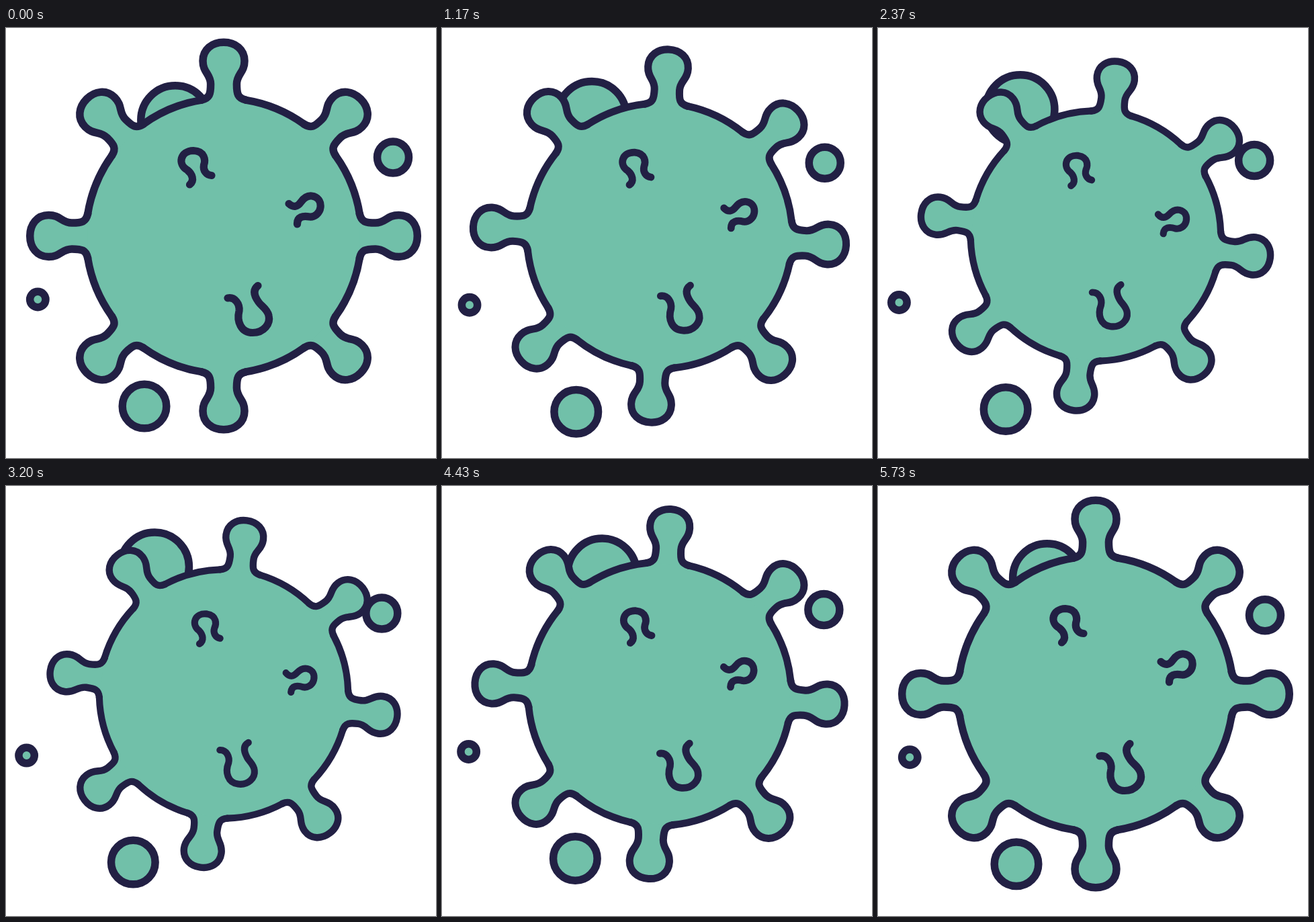
An HTML page that plays this animation: 640x640 px, repeating every 5760 ms.

```html
<!DOCTYPE html>
<html lang="en">
<head>
<meta charset="utf-8">
<title>Virus</title>
<style>
  html, body { margin: 0; width: 100%; height: 100%; overflow: hidden; background: #fff; }
  svg { display: block; width: 100vw; height: 100vh; }
  .cell { fill: #71c0a9; stroke: #222044; stroke-width: 11.5; }
  #virus { stroke-width: 11.2; stroke-linecap: round; }
  #virus .cell { stroke-width: inherit; }
  .mark { fill: none; stroke: #222044; }
</style>
</head>
<body>
<svg viewBox="0 0 640 640">
  <defs>
    <path id="arm" class="cell" d="M-33 -202.3C-21 -205 -19.4 -211 -19.4 -226S-31 -243 -31 -260.5S-17 -288.3 0 -288.3S31 -278 31 -260.5S19.4 -241 19.4 -226S21 -205 33 -202.3"/>
  </defs>
  <circle id="rear" class="cell" cx="252" cy="137" r="51.2"/>
  <g id="drops">
    <circle class="cell" cx="576" cy="192.5" r="23.5"/>
    <circle class="cell" cx="47.3" cy="404" r="11.7"/>
    <circle class="cell" cx="206" cy="563" r="32.8"/>
  </g>
  <g id="virus">
    <!-- The outline is dashed so that it stays open under each arm. -->
    <circle class="cell" r="205" pathLength="360" stroke-dasharray="26.48 18.52" stroke-dashoffset="-9.26"/>
    <g id="arms"></g>
    <g class="mark" transform="translate(-324 -309.5)">
      <path d="M273.5 233C281 227 277 217 270 211.5C255 203 259 183 279 182.5C296 183 297 197 294.5 204C293 212 298 219 306 219.5"/>
      <path d="M421 261.5C428 268 434 266 439 259C444 252 450 249.5 455 250C464 251 469 258 468 267C467 276 459 281.5 452 281C442 279 433 281 433.5 292"/>
      <path d="M330 402C341 400 348 411 347 421C343 437 350 453.5 367 453.5C384 453.5 394 440 391 428C389 418 380 414 376 408C368 397 368 389 375 383.5"/>
    </g>
  </g>
</svg>
<script>
const LOOP = 5760;
const byId = id => document.getElementById(id);
const smooth = u => u * u * (3 - 2 * u);
const move = (id, transform) => byId(id).setAttribute('transform', transform);

byId('arms').innerHTML = Array.from({ length: 8 }, (_, i) =>
  `<use href="#arm" transform="rotate(${i * 45})"/>`).join('');

// Eases out over the first third of the loop, then returns at a steadier pace.
function drift(p) {
  if (p < 1 / 3) return smooth(p * 3);
  const u = (1 - p) * 1.5;
  return (u + smooth(u)) / 2;
}

function render(t) {
  const p = t / LOOP;
  const swing = smooth(1 - Math.abs(2 * p - 1));
  move('virus', `translate(324 309.5) rotate(${7.9 * swing}) scale(${1 - .1 * swing})`);
  move('drops', `translate(${-17.3 * swing} ${8.6 * Math.sin(2 * Math.PI * p)})`);
  move('rear', `translate(${-43.7 * drift(p)} ${-17.4 * swing})`);
}

const begin = performance.now();
function tick(now) {
  render(Math.max(0, now - begin) % LOOP);
  requestAnimationFrame(tick);
}
render(0);
requestAnimationFrame(tick);
</script>
</body>
</html>
```
